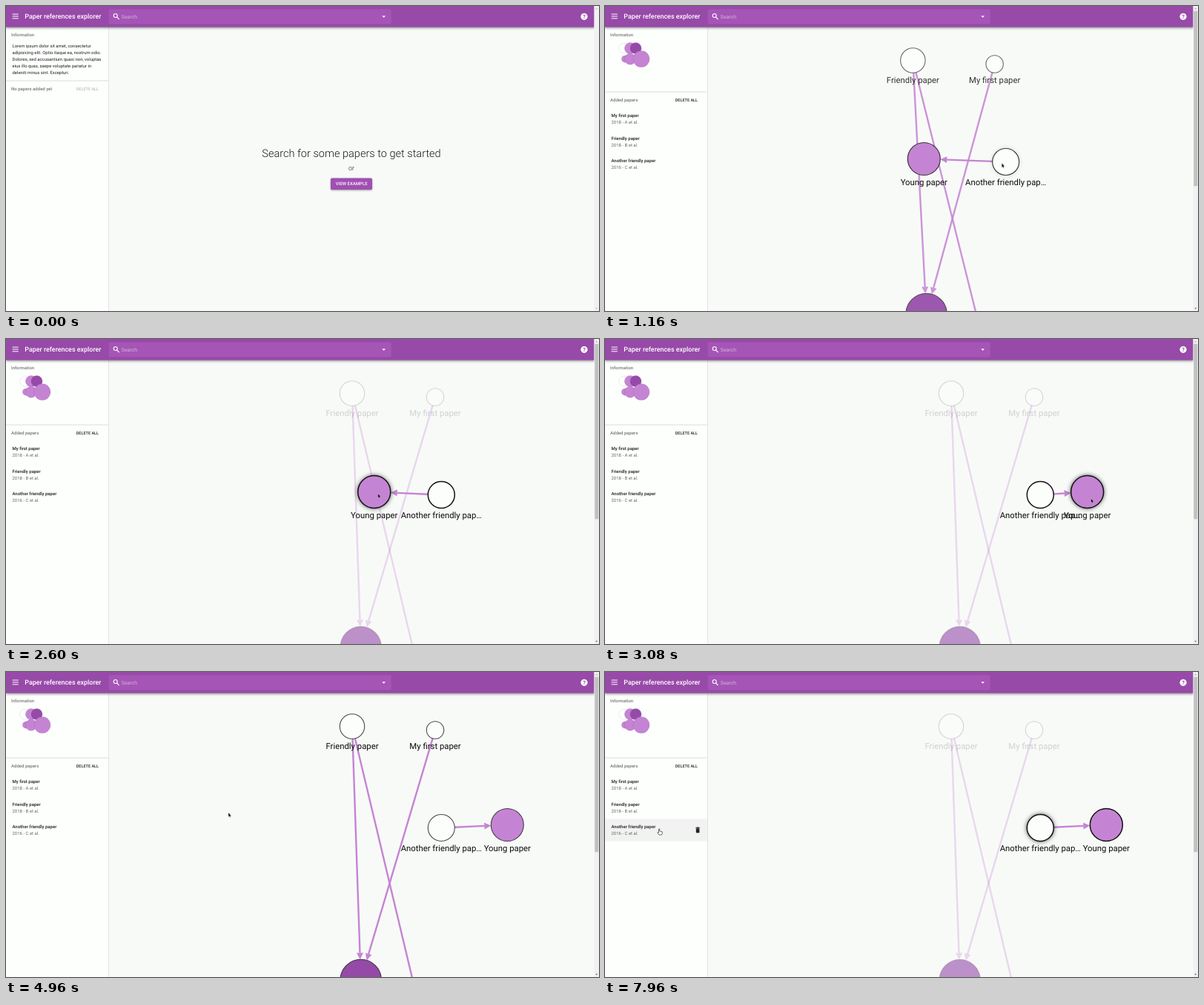
These frames come from a looping animation (800x412 px, 8 s). An HTML page with a canvas:

```html
<!DOCTYPE html>
<html lang="en">
<head>
<meta charset="utf-8">
<title>Paper references explorer</title>
<style>
html, body { margin: 0; width: 100%; height: 100%; overflow: hidden; background: #f8faf8; }
canvas { display: block; width: 800px; height: 412px; }
</style>
</head>
<body>
<canvas id="stage"></canvas>
<script>
const W = 800, H = 412, LOOP = 8000, START = 400, DROP = 4120;
const LIGHT = '#c584d3', DARK = '#954aa8', INK = '#202020', GREY = '#777';
const canvas = document.getElementById('stage');
const ctx = canvas.getContext('2d');
const dpr = window.devicePixelRatio || 1;
canvas.width = W * dpr;
canvas.height = H * dpr;

// x: resting place, lag: distance still to travel at 800 ms
const nodes = [
  { name: 'Friendly paper', x: 467, y: 73.5, r: 16.7, lag: 134, fill: '#fcfefc' },
  { name: 'My first paper', x: 579, y: 78.5, r: 11.7, lag: 138.5, fill: '#fcfefc' },
  { name: 'Young paper', x: 475, y: 206.5, r: 22, lag: 116, fill: LIGHT },
  { name: 'Another friendly pap…', x: 587.3, y: 210.5, r: 18, lag: 121, fill: '#fcfefc' },
  { name: '', x: 478.7, y: 416, r: 27.7, lag: 117, fill: DARK },
  { name: '', x: 583, y: 560, r: 24, lag: 120, fill: LIGHT }
];
const links = [[0, 4], [0, 5], [1, 4], [3, 2]];
const papers = [
  ['My first paper', '2018 - A et al.'],
  ['Friendly paper', '2018 - B et al.'],
  ['Another friendly paper', '2016 - C et al.']
];
const lorem = [
  'Lorem ipsum dolor sit amet, consectetur',
  'adipisicing elit. Optio itaque ea, nostrum odio.',
  'Dolores, sed accusantium quasi non, voluptas',
  'eius illo quas, saepe voluptate pariatur in',
  'deleniti minus sint. Excepturi.'
];

// [time, hovered node], -1 for none
const hovers = [[0, -1], [1120, 3], [2080, 2], [4240, -1], [5280, 1], [6360, 0], [7680, 3]];
const pointer = [
  [900, 478, 239], [1180, 536, 212], [1600, 509.7, 201.5], [2120, 480, 208],
  [2440, 480, 208], [3200, 668, 216], [3900, 685, 226], [4120, 683, 228],
  [4960, 300, 190], [5640, 79, 150], [6200, 79, 150], [6800, 76, 181],
  [7600, 76, 181], [7920, 73.5, 212]
];
const drag = [[2440, 475], [3200, 663], [3900, 680], [4120, 676.3]];

const clamp = v => Math.min(1, Math.max(0, v));
const mix = (a, b, k) => a + (b - a) * k;
const ease = k => k * k * (3 - 2 * k);

function track(keys, t) {
  let i = 0;
  while (i < keys.length - 1 && t >= keys[i + 1][0]) i++;
  const a = keys[i], b = keys[i + 1] || a;
  const k = b === a ? 0 : ease(clamp((t - a[0]) / (b[0] - a[0])));
  return a.slice(1).map((v, j) => mix(v, b[j + 1], k));
}

function text(s, x, y, size, color, weight = 400, align = 'left') {
  ctx.font = `${weight} ${size}px Roboto, sans-serif`;
  ctx.textAlign = align;
  ctx.fillStyle = color;
  ctx.fillText(s, x, y);
}

function rect(x, y, w, h, color, r = 0) {
  ctx.fillStyle = color;
  ctx.beginPath();
  ctx.roundRect(x, y, w, h, r);
  ctx.fill();
}

function circle(x, y, r) {
  ctx.beginPath();
  ctx.arc(x, y, r, 0, 7);
}

function poly(points, color) {
  ctx.beginPath();
  points.forEach(([x, y]) => ctx.lineTo(x, y));
  ctx.closePath();
  ctx.fillStyle = color;
  ctx.fill();
}

function shadow(color, blur, dy = 0) {
  ctx.shadowColor = color;
  ctx.shadowBlur = blur * dpr;
  ctx.shadowOffsetY = dy * dpr;
}

function noShadow() {
  shadow('transparent', 0);
}

// Emphasis of every node: on 0..1 = dimmed..lit, strong = highlighted, glow = hovered
function emphasis(i, hover) {
  if (hover < 0) return { on: 1, strong: 0, glow: 0 };
  const lit = i === hover || links.some(l => l.includes(i) && l.includes(hover)) ? 1 : 0;
  return { on: lit, strong: lit, glow: i === hover ? 1 : 0 };
}

function hoverAt(t) {
  let i = hovers.length - 1;
  while (i && t < hovers[i][0]) i--;
  return { now: hovers[i][1], was: hovers[Math.max(0, i - 1)][1], k: clamp((t - hovers[i][0]) / 200) };
}

function layout(t) {
  const left = t > 2080 ? 0 : Math.max(0, (Math.exp(-2.47 * (t - 800) / 1000) - 0.04) / 0.96);
  return nodes.map((n, i) => ({
    ...n,
    x: i === 2 && t >= 2440 ? track(drag, t)[0] : n.x - n.lag * Math.min(left, 2.4)
  }));
}

function drawLink(a, b, on) {
  const d = Math.hypot(b.x - a.x, b.y - a.y);
  const ux = (b.x - a.x) / d, uy = (b.y - a.y) / d;
  const tx = b.x - ux * b.r, ty = b.y - uy * b.r;
  const bx = tx - ux * 9, by = ty - uy * 9;
  ctx.globalAlpha = mix(0.3, 1, on);
  ctx.strokeStyle = LIGHT;
  ctx.lineWidth = 2.4;
  ctx.beginPath();
  ctx.moveTo(a.x + ux * a.r, a.y + uy * a.r);
  ctx.lineTo(bx, by);
  ctx.stroke();
  poly([[tx, ty], [bx - uy * 4.5, by + ux * 4.5], [bx + uy * 4.5, by - ux * 4.5]], LIGHT);
  ctx.globalAlpha = 1;
}

function drawNode(n, e) {
  circle(n.x, n.y, n.r);
  if (e.glow > 0) shadow(`rgba(0,0,0,${0.8 * e.glow})`, 6);
  ctx.globalAlpha = mix(0.6, 1, e.on);
  ctx.fillStyle = n.fill;
  ctx.fill();
  noShadow();
  ctx.globalAlpha = mix(0.16, mix(0.75, 1, e.strong), e.on);
  ctx.strokeStyle = '#111';
  ctx.lineWidth = mix(1.1, 1.5, e.strong);
  ctx.stroke();
  ctx.globalAlpha = mix(0.17, 1, e.on);
  text(n.name, n.x, n.y < 150 ? 104 : 242.4, 11.33, '#0c0c0c', 400, 'center');
  ctx.globalAlpha = 1;
}

function drawGraph(t) {
  const h = hoverAt(t);
  const placed = layout(t);
  const marks = nodes.map((_, i) => {
    const a = emphasis(i, h.was), b = emphasis(i, h.now);
    return { on: mix(a.on, b.on, h.k), strong: mix(a.strong, b.strong, h.k), glow: mix(a.glow, b.glow, h.k) };
  });
  const linkOn = (l, hover) => hover < 0 || l.includes(hover) ? 1 : 0;
  ctx.save();
  ctx.beginPath();
  // while dragging, the repaint area ends just right of the node
  ctx.rect(139, 29, t > 2440 && t < DROP ? 570 : 654, H - 29);
  ctx.clip();
  links.forEach(l => drawLink(placed[l[0]], placed[l[1]], mix(linkOn(l, h.was), linkOn(l, h.now), h.k)));
  [0, 1, 3, 4, 5, 2].forEach(i => drawNode(placed[i], marks[i]));
  ctx.restore();
}

function drawIntro() {
  text('Search for some papers to get started', 466, 204.2, 14.55, '#181818', 300, 'center');
  text('or', 466, 221.6, 9.06, '#222', 300, 'center');
  shadow('rgba(0,0,0,.4)', 2.5, 1);
  rect(438, 232.6, 56, 15.4, '#a04fb2', 1.8);
  noShadow();
  text('VIEW EXAMPLE', 466.2, 242.4, 6, '#fff', 500, 'center');
}

function drawBin(y) {
  rect(122.8, y - 2.2, 4.6, 6, '#222', 0.6);
  rect(122.1, y - 3.6, 6, 0.9, '#222');
  rect(124, y - 4.1, 2.2, 0.8, '#222');
}

function drawSidebar(t) {
  const open = t >= START;
  rect(0, 29, 138, H - 29, '#fdfffd');
  rect(138, 29, 0.8, H - 29, '#dcdedc');
  text('Information', 7, 41.3, 5.95, GREY, 500);
  const top = open ? 116 : 101;
  rect(0, top - 0.4, 138, 0.8, '#dcdedc');
  text(open ? 'Added papers' : 'No papers added yet', 7, top + 12.8, 6, GREY, 500);
  text('DELETE ALL', 125, top + 12.7, 5.5, open ? INK : '#bbb', 500, 'right');
  if (!open) {
    lorem.forEach((line, i) => text(line, 8.5, 55.8 + i * 9, 5.92, INK));
    return;
  }
  const dots = [
    [25.7, 57, 7, '#fdfffd'], [34, 57, 7.6, LIGHT], [41.5, 57, 7.6, DARK],
    [27, 71.6, 4.6, LIGHT], [34, 71.6, 7.6, LIGHT], [49, 71.6, 11, LIGHT]
  ];
  dots.forEach(([x, y, r, color], i) => {
    circle(x, y, r);
    ctx.fillStyle = color;
    ctx.fill();
    ctx.strokeStyle = i ? 'rgba(120,60,140,.3)' : '#ddd';
    ctx.lineWidth = 0.6;
    ctx.stroke();
  });
  const row = t >= 5280 ? [1, 0, 2].indexOf([1, 0, 2][hoverAt(t).now === 1 ? 0 : hoverAt(t).now === 0 ? 1 : 2]) : -1;
  papers.forEach(([name, info], i) => {
    const y = 137.3 + i * 30.6;
    if (i === row) {
      rect(0, y, 138, 30, '#f1f2f1');
      drawBin(y + 15);
    }
    text(name, 8.5, y + 12.6, 6, INK, 500);
    text(info, 8.5, y + 21.7, 5.98, '#666');
  });
}

function drawBar() {
  shadow('rgba(0,0,0,.4)', 3, 1);
  rect(0, 0, 793.5, 28.6, '#974aa8');
  noShadow();
  [11, 13.9, 16.8].forEach(y => rect(8.6, y - 0.5, 8.2, 1, '#fff'));
  text('Paper references explorer', 25.3, 17, 8.93, '#fff', 500);
  rect(138.7, 4.2, 381, 20, '#a555b6', 1.8);
  ctx.strokeStyle = '#fff';
  ctx.lineWidth = 1.1;
  circle(147.7, 13, 2.5);
  ctx.stroke();
  ctx.beginPath();
  ctx.moveTo(149.5, 14.9);
  ctx.lineTo(152.6, 18);
  ctx.stroke();
  text('Search', 155.8, 16.7, 6.9, '#d7b2df');
  poly([[507.3, 13.3], [512, 13.3], [509.65, 15.8]], '#fff');
  circle(780, 14.3, 4.6);
  ctx.fillStyle = '#fff';
  ctx.fill();
  text('?', 780, 17, 7.4, '#974aa8', 700, 'center');
}

function drawScroll(open) {
  rect(793.5, 0, 6.5, H, '#f1f0f2');
  poly([[795.3, 4.2], [798.1, 4.2], [796.7, 2.6]], open ? '#a3a3a3' : '#b5b5b5');
  poly([[795.3, 407.8], [798.1, 407.8], [796.7, 409.4]], open ? '#555' : '#b5b5b5');
  if (open) rect(794.3, 6.8, 5, 236.4, '#c1c1c1');
}

function drawPointer(t) {
  const [x, y] = track(pointer, t);
  ctx.save();
  ctx.translate(x, y);
  ctx.lineWidth = 0.7;
  ctx.lineJoin = 'round';
  if (x < 138) {
    const hand = [[-1, 0], [0.2, 0], [0.4, 3], [3.6, 3.8], [3.8, 6], [2.8, 8], [-0.6, 8], [-2.8, 5], [-2.2, 4.3], [-0.9, 5.2]];
    poly(hand, '#fff');
    ctx.strokeStyle = '#333';
  } else {
    const arrow = [[0, 0], [0, 5.8], [1.3, 4.6], [2.2, 6.6], [3.1, 6.2], [2.3, 4.3], [4, 4.2]];
    poly(arrow, '#111');
    ctx.strokeStyle = 'rgba(255,255,255,.7)';
    ctx.lineWidth = 0.4;
  }
  ctx.stroke();
  ctx.restore();
}

function draw(t) {
  const open = t >= START;
  ctx.setTransform(dpr, 0, 0, dpr, 0, 0);
  ctx.textRendering = 'geometricPrecision';
  rect(0, 0, W, H, '#f8faf8');
  if (open) drawGraph(t);
  else drawIntro();
  drawSidebar(t);
  drawBar();
  drawScroll(open);
  if (open) drawPointer(t);
}

const begin = performance.now();
function frame() {
  draw((performance.now() - begin) % LOOP);
  requestAnimationFrame(frame);
}
frame();
</script>
</body>
</html>
```
